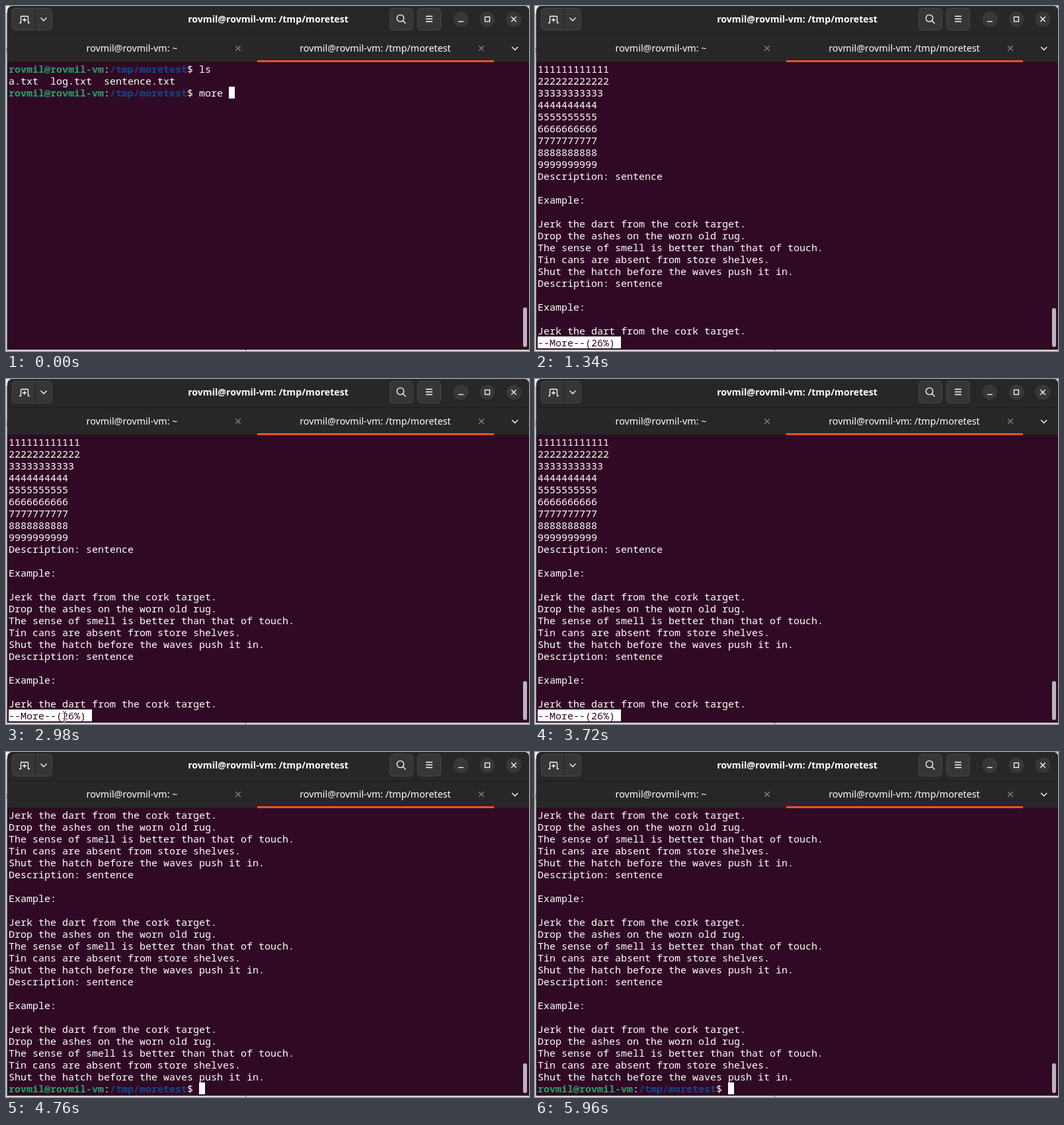
An HTML page that plays this animation: 791x522 px, repeating every 6.71 s.

```html
<!DOCTYPE html>
<html lang="en">
<head>
<meta charset="utf-8">
<title>Terminal pager</title>
<style>
html, body { margin: 0; width: 100%; height: 100%; overflow: hidden; background: #d3d3d3; }
svg { display: block; width: 791px; height: 522px; }
text { white-space: pre; fill: #fff; }
.ui text { font: 14.3px "Noto Sans", "Open Sans", sans-serif; text-anchor: middle; }
.ui .title { font-size: 14.15px; font-weight: 700; }
.term text { font: 15px "Noto Sans Mono", "DejaVu Sans Mono", monospace; }
.term .user { fill: #26a269; font-weight: 700; }
.term .path { fill: #12488b; font-weight: 700; }
.term .more { fill: #300a24; }
.btn { fill: #363636; stroke: #474747; }
.icon { fill: none; stroke: #fff; stroke-width: 1.3; }
.dim { fill: none; stroke: #858585; stroke-width: 1.3; }
.bar { fill: #bcb3b9; }

/* every change is a hard cut on a 6.71 s loop */
.page, .key, #caret, #beam { animation: 6.71s step-end infinite; }
.page, .key, #beam { visibility: hidden; }
#p0 { animation-name: shell; }
#p1 { animation-name: first; }
#p2 { animation-name: second; }
#p3 { animation-name: last; }
#k1 { animation-name: key1; }
#k2 { animation-name: key2; }
#k3 { animation-name: key3; }
#caret { animation-name: caret; }
#beam { animation-name: beam; }
@keyframes shell { 0% { visibility: visible } 19.970%, 100% { visibility: hidden } }
@keyframes first { 0% { visibility: hidden } 19.970% { visibility: visible } 57.526%, 100% { visibility: hidden } }
@keyframes second { 0% { visibility: hidden } 57.526% { visibility: visible } 70.938%, 100% { visibility: hidden } }
@keyframes last { 0% { visibility: hidden } 70.938%, 100% { visibility: visible } }
@keyframes key1 { 0% { visibility: hidden } 2.235% { visibility: visible } 19.970%, 100% { visibility: hidden } }
@keyframes key2 { 0% { visibility: hidden } 8.792% { visibility: visible } 19.970%, 100% { visibility: hidden } }
@keyframes key3 { 0% { visibility: hidden } 11.028% { visibility: visible } 19.970%, 100% { visibility: hidden } }
@keyframes caret {
  0% { transform: translateX(0) }
  2.235% { transform: translateX(9px) }
  8.792% { transform: translateX(18px) }
  11.028%, 100% { transform: translateX(54px) }
}
@keyframes beam {
  0% { visibility: hidden; transform: translate(124px, 208px) }
  30.998% { visibility: visible; transform: translate(124px, 208px) }
  33.233% { visibility: visible; transform: translate(90px, 213px) }
  35.469% { visibility: visible; transform: translate(90px, 425px) }
  37.704% { visibility: visible; transform: translate(97px, 451px) }
  39.940% { visibility: visible; transform: translate(75px, 505px) }
  42.175% { visibility: visible; transform: translate(71px, 504px) }
  44.411% { visibility: visible; transform: translate(85px, 502px) }
  46.646% { visibility: visible; transform: translate(86px, 501px) }
  48.733% { visibility: visible; transform: translate(111px, 482px) }
  50.968% { visibility: visible; transform: translate(163px, 428px) }
  55.439% { visibility: hidden; transform: translate(458px, 471px) }
  86.587% { visibility: visible; transform: translate(458px, 471px) }
  88.822%, 100% { visibility: hidden; transform: translate(458px, 471px) }
}
</style>
</head>
<body>
<svg viewBox="0 0 791 522">
  <rect width="791" height="522" fill="#d3d3d3"/>
  <path d="M0 0H12V12H0Z" fill="#f0f0f0"/>
  <path d="M1.5 10V520" stroke="#8d8d8d"/>
  <path d="M0 64.5Q2 64.5 2 67T0 70.5M362.5 520v2" fill="none" stroke="#555"/>
  <path d="M2 520V9Q2 0 11 0H783Q791 0 791 8V520Z" fill="#300a24"/>

  <g class="ui">
    <path d="M2 85V9Q2 0 11 0H783Q791 0 791 8V85Z" fill="#272727"/>
    <path d="M2 43.5H791" stroke="#1c1c1c"/>
    <path d="M2 84.5H791" stroke="#1c1c1c"/>
    <rect class="btn" x="9.5" y="3.5" width="60" height="33" rx="5"/>
    <path d="M44.5 4V36" stroke="#1f1f1f"/>
    <rect class="btn" x="580.5" y="3.5" width="35" height="33" rx="5"/>
    <rect class="btn" x="622.5" y="3.5" width="35" height="33" rx="5"/>
    <g fill="#383838">
      <circle cx="688" cy="20" r="11.5"/>
      <circle cx="728" cy="20" r="11.5"/>
      <circle cx="768" cy="20" r="11.5"/>
    </g>
    <g class="icon">
      <path d="M20 25.5H22.5V16.5Q22.5 15.5 23.5 15.5H32.5Q33.5 15.5 33.5 16.5V25.5H36M28 18V24M25 21H31"/>
      <path d="M52.5 17.8L57 22.3L61.5 17.8"/>
      <circle cx="596.5" cy="18.5" r="5.2"/>
      <path d="M600.3 22.3L604.5 26.5"/>
      <path d="M635 15.5H645M635 19.5H645M635 23.5H645"/>
      <path d="M684 23.5H692"/>
      <rect x="724.5" y="16.5" width="7" height="7"/>
      <path d="M764.3 16.3L771.7 23.7M771.7 16.3L764.3 23.7"/>
      <path d="M765.2 62L769.7 66.5L774.2 62"/>
    </g>
    <path class="dim" d="M347.2 60.2L354.8 67.8M354.8 60.2L347.2 67.8M715.2 60.2L722.8 67.8M722.8 60.2L715.2 67.8"/>
    <rect x="380" y="82" width="358" height="3" fill="#e95420"/>
    <text class="title" x="396.5" y="25">rovmil@rovmil-vm: /tmp/moretest</text>
    <text x="190.5" y="69">rovmil@rovmil-vm: ~</text>
    <text x="558.5" y="69">rovmil@rovmil-vm: /tmp/moretest</text>
  </g>

  <g class="term">
    <g id="p0" class="page"></g>
    <g id="p1" class="page"></g>
    <g id="p2" class="page"></g>
    <g id="p3" class="page"></g>
  </g>

  <g id="beam" fill="none">
    <path d="M1 1.5H2.5L3.5 2.5L4.5 1.5H6M3.5 2.5V14.5M1 15.5H2.5L3.5 14.5L4.5 15.5H6" stroke="#fff" stroke-width="2.6"/>
    <path d="M1 1.5H2.5L3.5 2.5L4.5 1.5H6M3.5 2.5V14.5M1 15.5H2.5L3.5 14.5L4.5 15.5H6" stroke="#111"/>
  </g>
</svg>
<script>
const CELL = 9, LINE = 18, LEFT = 4, TOP = 86;
const block = [
  'Description: sentence', '', 'Example:', '',
  'Jerk the dart from the cork target.',
  'Drop the ashes on the worn old rug.',
  'The sense of smell is better than that of touch.',
  'Tin cans are absent from store shelves.',
  'Shut the hatch before the waves push it in.'
];

const colX = col => LEFT + col * CELL;
const rowY = row => TOP + row * LINE;
const text = (str, row, col = 0, attr = '') =>
  `<text x="${colX(col)}" y="${rowY(row) + 15}" ${attr}>${str}</text>`;
const box = (row, col, cols, attr = '') =>
  `<rect x="${colX(col)}" y="${rowY(row)}" width="${cols * CELL}" height="${LINE}" fill="#fff" ${attr}/>`;
const prompt = (row, cmd = '') =>
  text('rovmil@rovmil-vm', row, 0, 'class="user"') + text(':', row, 16) +
  text('/tmp/moretest', row, 17, 'class="path"') + text('$ ' + cmd, row, 30);
const scrollbar = y => `<rect class="bar" x="782" y="${y}" width="6" height="${516 - y}" rx="3"/>`;
const passage = (start, from = 0) =>
  Array.from({ length: 23 - from }, (_, i) => text(block[(start + i) % 9], from + i)).join('');
const more = pct => box(23, 0, 14) + text(`--More--(${pct}%)`, 23, 0, 'class="more"');
const fill = (id, html) => { document.getElementById(id).innerHTML = html; };

const digits = Array.from({ length: 9 }, (_, i) =>
  text(String(i + 1).repeat(Math.max(10, Math.min(12, 13 - i))), i));
digits[0] = text('1'.repeat(12), 0);
digits[1] = text('2'.repeat(12), 1);

fill('p0', prompt(0, 'ls') + text('a.txt  log.txt  sentence.txt', 1) + prompt(2, 'more') +
  text('a', 2, 37, 'id="k1" class="key"') + text('.', 2, 38, 'id="k2" class="key"') +
  text('txt', 2, 39, 'id="k3" class="key"') + box(2, 37, 1, 'id="caret"') + scrollbar(456));
fill('p1', digits.join('') + passage(0, 9) + more(26) + scrollbar(457));
fill('p2', passage(5) + more(70) + scrollbar(466));
fill('p3', passage(4) + prompt(23) + box(23, 32, 1) + scrollbar(471));
</script>
</body>
</html>
```
